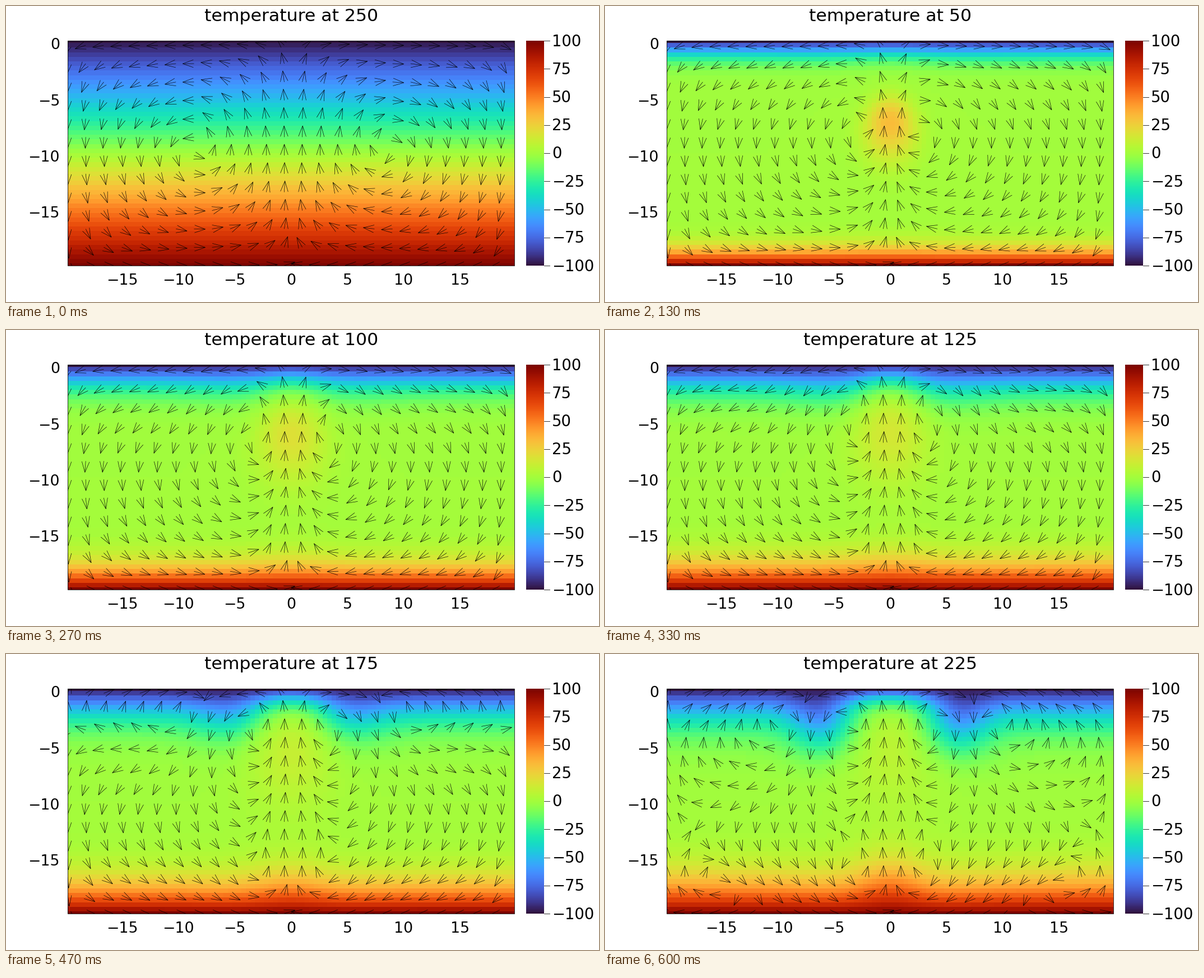
A matplotlib script that plays this animation: 1058 px wide and 529 px high, repeating every 670 ms.

```python
import numpy as np
import matplotlib.pyplot as plt
from matplotlib.animation import FuncAnimation
from matplotlib.collections import LineCollection
from matplotlib.patches import Rectangle

W, H, DPI = 1058, 529, 100
PX = 72 / DPI                                # points per pixel
LEFT, RIGHT, TOP, BOTTOM = 110, 907, 62, 464
UNIT = 20.1                                  # pixels per length unit

# Porous convection: hot blob between a hot floor and a cold lid
LX, LY, NX, NY = 40.0, 20.0, 100, 50
D = LX / NX
DELTA, PHI, RA = 200.0, 0.1, 500.0
LAM = DELTA * LY / PHI / RA
STEP = 4                                     # arrow spacing in cells
TICK, RATE = 10, 15                          # ms per draw, states per second


def cosines(n):
    k, i = np.arange(n)[:, None], np.arange(n)[None, :]
    c = np.sqrt(2 / n) * np.cos(np.pi * k * (i + 0.5) / n)
    c[0] /= np.sqrt(2)
    eig = (2 * np.cos(np.pi * np.arange(n) / n) - 2) / D**2
    return c, eig


CX, EX = cosines(NX)
CY, EY = cosines(NY)
EIG = EY[:, None] + EX[None, :]
EIG[0, 0] = 1.0


def darcy(T):
    """Divergence-free flux on cell faces, closed walls."""
    qx = np.zeros((NY, NX + 1))
    qy = np.zeros((NY + 1, NX))
    qy[1:-1] = (T[1:] + T[:-1]) / 2
    div = np.diff(qy, axis=0) / D
    spec = CY @ div @ CX.T / EIG
    spec[0, 0] = 0
    p = CY.T @ spec @ CX
    qx[:, 1:-1] = -np.diff(p, axis=1) / D
    qy[1:-1] -= np.diff(p, axis=0) / D
    return qx, qy


def advance(T, qx, qy):
    vmax = max(np.abs(qx).max(), np.abs(qy).max())
    dt = min(D**2 / LAM / 8.2, PHI * D / vmax / 2.1)
    T = T.copy()
    c = T[1:-1, 1:-1]
    lap = (T[1:-1, 2:] + T[1:-1, :-2] + T[2:, 1:-1] + T[:-2, 1:-1] - 4 * c)
    c += dt * LAM * lap / D**2
    gx = np.diff(T[1:-1], axis=1) / D
    gy = np.diff(T[:, 1:-1], axis=0) / D
    adv = (np.maximum(qx[1:-1, 1:-2], 0) * gx[:, :-1]
           + np.minimum(qx[1:-1, 2:-1], 0) * gx[:, 1:]
           + np.maximum(qy[1:-2, 1:-1], 0) * gy[:-1]
           + np.minimum(qy[2:-1, 1:-1], 0) * gy[1:])
    c -= dt / PHI * adv
    T[:, 0], T[:, -1] = T[:, 1], T[:, -2]
    return T


def arrows(qx, qy):
    """Shaft and open head of unit arrows, in pixels."""
    u = ((qx[:, 1:] + qx[:, :-1]) / 2)[::STEP, ::STEP]
    v = ((qy[1:] + qy[:-1]) / 2)[::STEP, ::STEP]
    mag = np.hypot(u, v) + 1e-12
    d = np.stack([u / mag, -v / mag], axis=-1)
    n = np.stack([-d[..., 1], d[..., 0]], axis=-1)
    px = LEFT + (RIGHT - LEFT) * np.arange(0, NX, STEP) / (NX - 1)
    py = BOTTOM - (BOTTOM - TOP) * np.arange(0, NY, STEP) / (NY - 1)
    tail = np.stack(np.meshgrid(px, py), axis=-1)
    tip = tail + UNIT * d
    back = tip - 19 * d
    shaft = np.stack([tail, tip], axis=2).reshape(-1, 2, 2)
    head = np.stack([back + 6.8 * n, tip, back - 6.8 * n], axis=2)
    return [*shaft, *head.reshape(-1, 3, 2)]


def conductive():
    """Linear profile with the last weak convection cell."""
    x = (np.arange(NX) + 0.5) * D - LX / 2
    depth = LY - (np.arange(NY)[:, None] + 0.5) * D
    a, b = np.pi * x / (LX / 2), np.pi * depth / LY
    warm = (np.sin(b) * (np.cos(a) + 0.17 * np.cos(2 * a))
            + 0.08 * np.sin(2 * b) * np.cos(a))
    T = np.linspace(DELTA / 2, -DELTA / 2, NY)[:, None] + 0 * x
    return T, arrows(*darcy(warm))


def simulate(steps, every):
    x = np.linspace(-LX / 2 + D / 2, LX / 2 - D / 2, NX)
    y = np.linspace(-LY + D / 2, D / 2, NY)[:, None]
    T = DELTA * np.exp(-x**2 - (y + LY / 2)**2)
    T[0], T[-1] = DELTA / 2, -DELTA / 2
    out = []
    for it in range(1, steps + 1):
        qx, qy = darcy(T)
        T = advance(T, qx, qy)
        if it % every == 0:
            out.append((it, T, arrows(qx, qy)))
    return out


states = [(250, *conductive())] + simulate(225, 25)

plt.rcParams["font.family"] = "DejaVu Sans"
fig = plt.figure(figsize=(W / DPI, H / DPI), dpi=DPI, facecolor="white")
ax = fig.add_axes([0, 0, 1, 1])
ax.axis("off")

box = Rectangle((LEFT, TOP), RIGHT - LEFT, BOTTOM - TOP, fill=False,
                ec="black", lw=0.8 * PX, zorder=4)
ax.add_patch(box)

hx = (RIGHT - LEFT) / (NX - 1) / 2
hy = (BOTTOM - TOP) / (NY - 1) / 2
shade = dict(cmap="turbo", vmin=-DELTA / 2, vmax=DELTA / 2, origin="lower",
             aspect="auto", interpolation="nearest")
heat = ax.imshow(states[0][1], zorder=1,
                 extent=(LEFT - hx, RIGHT + hx, BOTTOM + hy, TOP - hy), **shade)
heat.set_clip_path(box)
quiver = LineCollection(states[0][2], colors="black", linewidths=0.65 * PX,
                        joinstyle="bevel", capstyle="butt", zorder=3)
ax.add_collection(quiver)
quiver.set_clip_path(box)

ramp = np.linspace(-DELTA / 2, DELTA / 2, 256)[:, None]
ax.imshow(ramp, extent=(928, 960, BOTTOM, TOP), zorder=1, **shade)


def label(x, y, s, size, ha):
    return ax.text(x, y, s, fontsize=size * PX, ha=ha, va="baseline",
                   color="black")


def number(v):
    return str(v).replace("-", "\u2212")


for v in range(-15, 16, 5):
    label(508.5 + UNIT * v, 498, number(v), 26.7, "center")
for v in range(-15, 1, 5):
    label(96, 77 - UNIT * v, number(v), 26.7, "right")
for v in range(-100, 101, 25):
    y = (TOP + BOTTOM) / 2 - v * (BOTTOM - TOP) / DELTA
    ax.plot([960, 970], [y, y], color="black", lw=0.8 * PX)
    label(974, y + 9.5, number(v), 27.5, "left")

title = label(509.2, 27, "", 31.5, "center")
ax.set_xlim(0, W)
ax.set_ylim(H, 0)


def draw(k):
    it, T, lines = states[int((k + 0.5) * TICK * RATE / 1000)]
    title.set_text(f"temperature at {it}")
    heat.set_data(T)
    quiver.set_segments(lines)
    return heat, quiver, title


anim = FuncAnimation(fig, draw, frames=67, interval=TICK, repeat=True,
                     repeat_delay=0, blit=False)
plt.show()
```
